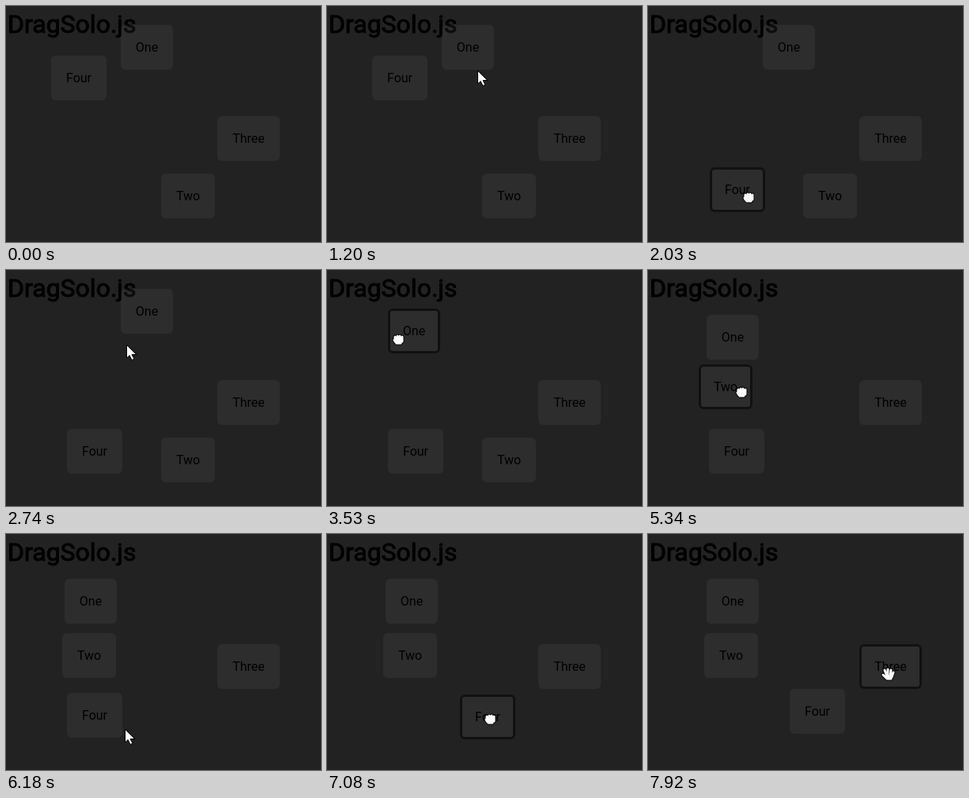
Recreate the animation shown at these times as an HTML page. Size 398x300 px, loop 7.99 s.

```html
<!DOCTYPE html>
<html lang="en">
<meta charset="utf-8">
<title>DragSolo.js</title>
<style>
  html, body { margin: 0; width: 100%; height: 100%; overflow: hidden; background: #222; }
  body { position: relative; font: 16px Roboto, sans-serif; color: #000; }
  h1 {
    position: absolute; left: 2px; top: 4px; margin: 0;
    font-size: 32px; font-weight: 400; line-height: 38px;
    -webkit-text-stroke: 1px #000;
  }
  .box {
    position: absolute; left: 0; top: 0; height: 57px; line-height: 57px;
    text-align: center; border-radius: 6px; background: rgba(255, 255, 255, .05);
  }
  .hover { box-shadow: inset 0 0 0 3px #111; }
  svg { position: absolute; left: 0; top: 0; width: 1px; height: 1px; overflow: visible; }
  path { fill: none; stroke: #000; stroke-width: 5; stroke-linecap: round; stroke-linejoin: round; }
  path + path { stroke: #fff; stroke-width: 3; }
  #arrow path { fill: #fff; stroke-width: 1; }
</style>
<h1>DragSolo.js</h1>
<svg id="cursor">
  <g id="arrow"><path d="M.5 .5V17L4 13.5L7 19.5L10 18L7 12.5H12.5Z"/></g>
  <g id="open"><path d="M-2 3L-5-5M-1 3V-6M2 3L3-5M4 4L6-2M-2 3H4M3 6H-2L-7 1"/></g>
  <g id="closed"><path d="M-4-3V3M-1-4V3M2-4V3M5-3V3M-5 1L-2 5H3M-4 2H4"/></g>
</svg>
<script>
const LOOP = 7990;

// Pointer path: time, x, y and an optional rest
const path = [
  [430, 390, 285], [830, 262, 185], [1200, 190, 82], [1380, 160, 66],
  [1620, 106, 101, 80], [1800, 104, 120], [2030, 127, 243, 70], [2180, 128, 263],
  [2330, 126, 240, 90], [2860, 158, 63, 120], [3530, 90, 88, 60], [3770, 87, 96, 60],
  [4050, 200, 140], [4300, 365, 170], [4620, 286, 225], [4730, 265, 243, 60],
  [4850, 250, 248, 50], [5160, 125, 104], [5270, 99, 125], [5390, 129, 167, 60],
  [5510, 123, 163], [5640, 125, 161, 140], [5950, 185, 205], [6180, 150, 248, 50],
  [6430, 115, 233, 70], [6840, 160, 237], [7080, 206, 235, 110], [7300, 232, 228],
  [7440, 213, 233], [7500, 217, 228, 60], [7920, 304, 178]
].flatMap(([t, x, y, rest]) => rest ? [[t, x, y], [t + rest, x, y]] : [[t, x, y]]);

// Each drag is [grab time, release time]
const boxes = [
  { text: 'One', x: 145, y: 24, w: 66, drags: [[2920, 3800]] },
  { text: 'Two', x: 196, y: 213, w: 68, drags: [[4880, 5700]] },
  { text: 'Three', x: 267, y: 140, w: 79, drags: [] },
  { text: 'Four', x: 57, y: 63, w: 70, drags: [[1660, 2400], [6460, 7530]] }
];

const $ = id => document.getElementById(id);
const cursor = $('cursor');

// White inside the dark outline of the hands
for (const id of ['open', 'closed']) $(id).append($(id).firstChild.cloneNode());

for (const b of boxes) {
  b.el = document.createElement('div');
  b.el.className = 'box';
  b.el.textContent = b.text;
  b.el.style.width = b.w + 'px';
  document.body.insertBefore(b.el, cursor);
}

const rate = (i, k) => (path[i + 1][k] - path[i][k]) / (path[i + 1][0] - path[i][0]);

// Monotone slope, so that the pointer never overshoots a key
function slope(i, k) {
  if (i === 0 || i === path.length - 1) return 0;
  const a = rate(i - 1, k), b = rate(i, k);
  return a * b > 0 ? 2 * a * b / (a + b) : 0;
}

function pointer(t) {
  const last = path.length - 1;
  if (t >= path[last][0]) return path[last].slice(1);
  if (t <= path[0][0]) return path[0].slice(1);
  const i = path.findIndex(p => p[0] > t) - 1;
  const dt = path[i + 1][0] - path[i][0], s = (t - path[i][0]) / dt;
  const h = s * s * (3 - 2 * s);
  return [1, 2].map(k =>
    path[i][k] * (1 - h) + path[i + 1][k] * h +
    dt * s * (1 - s) * ((1 - s) * slope(i, k) - s * slope(i + 1, k)));
}

const move = (el, x, y) => {
  el.style.transform = `translate(${Math.round(x)}px, ${Math.round(y)}px)`;
};

function draw(t) {
  const [px, py] = pointer(t), visible = t >= path[0][0];
  let held = null, over = null;
  for (const b of boxes) {
    let { x, y } = b;
    for (const [from, to] of b.drags) {
      if (t < from) continue;
      const a = pointer(from), c = pointer(Math.min(t, to));
      x += c[0] - a[0];
      y += c[1] - a[1];
      if (t < to) held = b;
    }
    move(b.el, x, y);
    if (visible && px >= x && px < x + b.w && py >= y && py < y + 57) over = b;
  }
  over = held || over;
  for (const b of boxes) b.el.classList.toggle('hover', b === over);

  const shape = held ? 'closed' : over ? 'open' : 'arrow';
  for (const id of ['arrow', 'open', 'closed'])
    $(id).style.display = visible && id === shape ? '' : 'none';
  move(cursor, px, py);
}

function tick() {
  draw(performance.now() % LOOP);
  requestAnimationFrame(tick);
}
tick();
</script>
</html>
```
